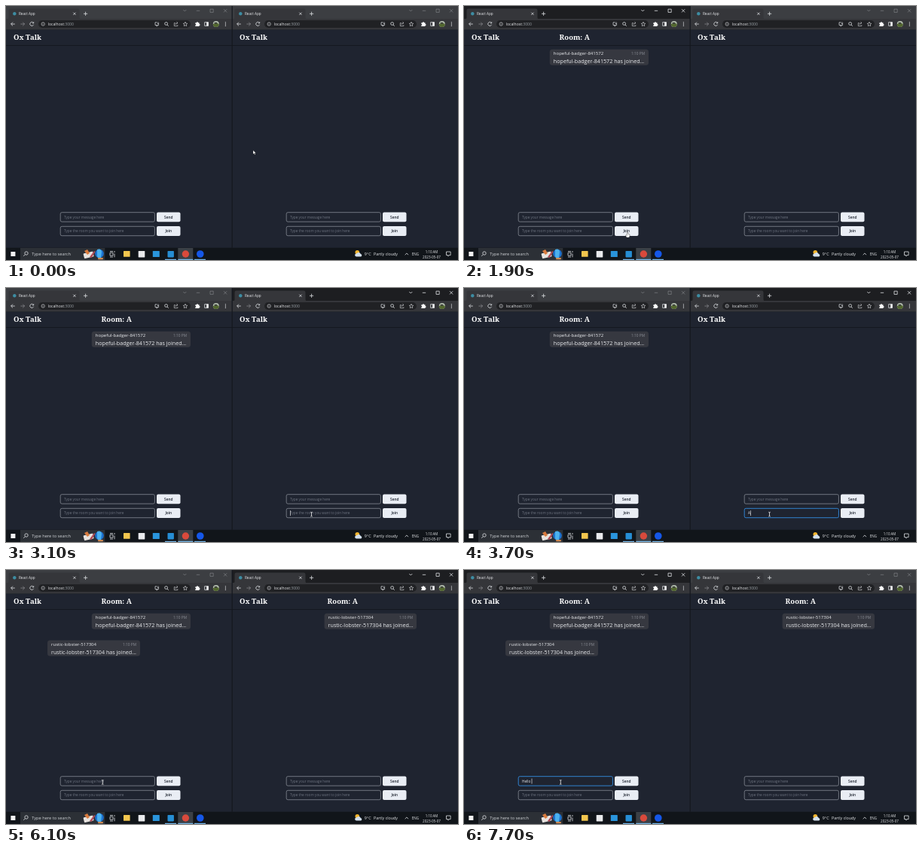
Animation, 600 px wide and 338 px high, one loop 8000 ms. Source, as an HTML page:

```html
<!DOCTYPE html>
<html lang="en">
<head>
<meta charset="utf-8">
<title>Chat demo</title>
<style>
  html, body { margin: 0; width: 100%; height: 100%; overflow: hidden; background: #1f2430; }
  svg { display: block; width: 100vw; height: 100vh; }
  text { font-family: "Open Sans", "Noto Sans", sans-serif; fill: #e8eaed; white-space: pre; }
  .head { font: bold 9.5px "Noto Serif", serif; fill: #fff; }
  .btn { font-size: 4.8px; font-weight: 600; fill: #1a202c; text-anchor: middle; }
  .field { font-size: 4.7px; }
  .line { fill: none; stroke: #dfe1e5; stroke-width: .8; }
</style>
</head>
<body>
<svg id="stage" viewBox="0 0 600 338" xmlns="http://www.w3.org/2000/svg"></svg>
<script>
const LOOP = 8000, STEP = 100;
const BADGER = 'hopeful-badger-841572', LOBSTER = 'rustic-lobster-517304';
const stage = document.getElementById('stage');
const $ = id => document.getElementById(id);

const text = (x, y, size, str, extra = '') =>
  `<text x="${x}" y="${y}" font-size="${size}" ${extra}>${str}</text>`;
const rect = (x, y, w, h, fill, rx = 0, extra = '') =>
  `<rect x="${x}" y="${y}" width="${w}" height="${h}" rx="${rx}" fill="${fill}" ${extra}/>`;
const dot = (x, y, r, fill) => `<circle cx="${x}" cy="${y}" r="${r}" fill="${fill}"/>`;
const line = (d, extra = '') => `<path class="line" d="${d}" ${extra}/>`;

function bubble(id, x, y, w, name) {
  return `<g id="${id}">${rect(x, y, w, 21, '#363840', 3.5)}
    ${text(x + 5, y + 7.3, 6.05, name)}
    ${text(x + w - 5, y + 7.2, 4.8, '1:10 PM', 'text-anchor="end" style="fill:#8c8f98"')}
    ${text(x + 5, y + 18, 7.17, name + ' has joined...')}</g>`;
}

function field(id, y, hint, label) {
  return `${rect(72.2, y, 125.2, 12.4, 'none', 2, `id="${id}Box"`)}
    <text id="${id}Hint" class="field" x="77" y="${y + 8}" style="fill:#6d737f">${hint}</text>
    <text id="${id}Text" class="field" x="77" y="${y + 8}"></text>
    ${rect(0, y + 2.8, .6, 7, '#fff', 0, `id="${id}Caret"`)}
    ${rect(200, y - .2, 31.5, 12.8, '#e9edf4', 2)}
    <text class="btn" x="215.8" y="${y + 8}">${label}</text>`;
}

function chrome(id) {
  return `${rect(0, 0, 300, 18, '#1d1e21', 0, `id="${id}Bar"`)}
    <path d="M1 17.5Q3.5 17.5 3.5 15V6Q3.5 3.5 6 3.5H95Q97.500 3.500 97.500 6V15Q97.500 17.500 100 17.500Z" fill="#35363a"/>
    ${rect(0, 17, 300, 14.5, '#35363a')}
    ${dot(11.3, 10.3, 2.2, '#3d8da3')}
    ${text(17, 12, 4.6, 'React App')}
    ${line('M89.300 8.700l3.200 3.200m0-3.200l-3.200 3.200M103 10.300h5.200m-2.600-2.600v5.200')}
    <g id="${id}Ctl">${line('M235.300 5l2 2 2-2M252.800 6.300h4.400M271 4.200h4.200v4.200h-4.200zM289 4.200l4.200 4.200m0-4.200l-4.200 4.200')}</g>
    ${line('M11.800 24H6.600m2.400-2.400L6.600 24l2.400 2.400')}
    ${line('M19.400 24h5.200m-2.400-2.400L24.600 24l-2.400 2.400', 'opacity=".45"')}
    ${line('M36.200 22.300A2.500 2.500 0 1 0 36.600 24.800M36.700 21.200v1.700H35')}
    ${rect(43, 18.9, 202, 10.2, '#202124', 5.1)}
    <circle class="line" cx="49.200" cy="24" r="2.200" style="stroke-width:.6"/>
    ${line('M49.200 23.600v1.600m0-2.700v.5', 'style="stroke-width:.5"')}
    ${text(55.8, 25.9, 5.05, 'localhost<tspan style="fill:#9aa0a6">:3000</tspan>')}
    ${line('M200.500 21.800h-2.500v3.700h4.600v-1.300M199.200 26.700h2.200M202 21.300v2.500m-1.200-1l1.200 1.200 1.200-1', 'style="stroke-width:.7"')}
    <circle class="line" cx="212.600" cy="23.500" r="1.900"/>${line('M214 25l1.800 1.800')}
    ${line('M224.800 22.600h-1.500v4h4.600v-1.400M224.800 25q.3-2.300 3-2.500m-1.200-1.300l1.400 1.300-1.400 1.300', 'style="stroke-width:.6"')}
    ${line('M238 21.200l.8 1.900 2 .2-1.500 1.400.4 2-1.700-1-1.700 1 .4-2-1.500-1.400 2-.2z', 'style="stroke-width:.6"')}
    <path d="M251.300 22.300h1.600a1.100 1.100 0 0 1 2.200 0h1.400v1.600a1.100 1.100 0 0 1 0 2.200v1h-5.200v-1.500a.9.9 0 0 0 0-1.800z" fill="#fff"/>
    ${line('M263.700 21.600h4.800v4.800h-4.800z')}${rect(266.2, 21.6, 2.3, 4.8, '#fff')}
    ${dot(278.8, 24, 4, '#b9c3b4')}
    <path d="M274.800 24a4 4 0 0 0 8 0q-3-2-8 0z" fill="#52672e"/>
    ${rect(276.4, 21.7, 4.2, 2, '#3b4038', 1)}
    ${[21.8, 24, 26.2].map(y => dot(291.4, y, .65, '#e8eaed')).join('')}`;
}

function win(id, x, bubbles) {
  return `<g transform="translate(${x})">${rect(0, 0, 300, 322, '#1f2430')}
    ${chrome(id)}
    ${rect(0, 31.3, 300, .7, '#25272d')}${rect(0, 52, 300, .9, '#13171f')}
    <text class="head" x="10" y="45.200">Ox Talk</text>
    <text class="head" id="${id}Room" x="126.600" y="45.200">Room: A</text>
    ${bubbles}
    ${field(id + 'Msg', 274.7, 'Type your message here', 'Send')}
    ${field(id + 'Join', 293.3, 'Type the room you want to join here', 'Join')}
  </g>`;
}

function taskbar() {
  return `${rect(0, 321.7, 600, 16.3, '#11151a')}
    ${rect(6.4, 327, 6, 6, '#f2f2f2')}
    ${rect(19, 322, 112.3, 16, '#2c3036')}
    <circle class="line" cx="27" cy="329" r="2.200"/>${line('M25.400 330.700l-2.200 2.200')}
    ${text(34.2, 332.2, 5.66, 'Type here to search', 'style="fill:#d0d3d7"')}
    ${rect(103, 328, 13, 7, '#e8e4e0', 1, 'transform="rotate(-14 109 331)"')}
    <path d="M104 326l4-2 3 5-3 2z" fill="#d97b3e"/><path d="M111 334l6-8 1.500 1-5 8z" fill="#b14b57"/>
    ${dot(124, 329.5, 5.8, '#1c72d0')}
    <path d="M121 324q5-2 6 3l-1 8q-4 2-5-2z" fill="#4cb1ee"/>${rect(122, 335, 7, 2.3, '#cc8954', 1)}
    ${line('M138 328.300h4v3.800h-4zM138 326.500h4M138 334h4M144 326v2m0 1.500v4.800')}
    ${rect(156, 326, 8.6, 7.8, '#f3c64e', .6)}
    ${rect(175.7, 326, 8.6, 8.4, '#e9eaec', .6)}
    ${rect(194.8, 326, 9, 8, '#2a95dc', .6)}
    ${rect(228.3, 322, 20, 16, '#3b4046')}
    ${rect(214.5, 326, 8.4, 8.4, '#268ed4', .8)}
    ${dot(238.4, 330, 4.7, '#d94a3c')}
    ${dot(257.8, 330, 4.8, '#1557e8')}
    ${rect(211, 336.8, 15, 1.2, '#75b5e6')}${rect(228.3, 336.8, 20, 1.2, '#75b5e6')}${rect(250, 336.8, 15, 1.2, '#75b5e6')}
    ${dot(466.3, 327.8, 2.8, '#f3b52f')}
    <path d="M465 333.500a2 2 0 0 1 .3-4 3 3 0 0 1 5.500.5 1.800 1.800 0 0 1 .2 3.500z" fill="#d3e0ee"/>
    ${text(475.8, 332, 5.35, '9°C')}${text(488, 332, 5.35, 'Partly cloudy')}
    ${line('M529.700 331.200l2.200-2.200 2.200 2.200')}
    ${text(538.8, 332, 4.6, 'ENG')}
    ${text(565, 328.6, 4.4, '1:10 AM', 'text-anchor="middle"')}
    ${text(565, 336, 4.6, '2023-05-07', 'text-anchor="middle"')}
    ${line('M584.500 327h5.600v4.600h-2l-1.200 1.500v-1.500h-2.400z')}`;
}

stage.innerHTML =
  win('L', 0, bubble('first', 113.8, 57.8, 131.2, BADGER) + bubble('second', 55, 93.6, 123, LOBSTER)) +
  win('R', 300, bubble('third', 122.6, 57.8, 122.4, LOBSTER)) +
  rect(299.6, 0, 1.2, 321.7, '#15181f') + taskbar() +
  `<g id="cursor">
    <path id="arrow" d="M0 0V5.200L1.300 4.100 2.200 6.100 3.100 5.700 2.200 3.800H3.800Z" fill="#fff" stroke="#111" stroke-width=".3"/>
    <path id="beam" d="M-1.200-2.800Q0-2.800 0-2V2.200Q0 3-1.200 3M1.200-2.800Q0-2.800 0-2M0 2.200Q0 3 1.200 3" fill="none" stroke="#f4f4f4" stroke-width=".8"/>
    <path id="hand" d="M-.7 0Q0-.8.7 0V2.300L3 3V5L2.200 7H-1.200L-2.600 4.300-1.800 3.700-.7 4.600Z" fill="#fff" stroke="#111" stroke-width=".35"/>
  </g>`;

// time, x, y of the pointer
const PATH = [[0, 328, 192], [499, 328, 192], [500, 132.5, 296], [1300, 132.5, 296], [1700, 217, 301],
  [1900, 217, 301], [2200, 238, 303], [2500, 389.5, 298], [3000, 405.5, 301], [3900, 405.5, 301],
  [4400, 516, 302], [4600, 516, 303], [4700, 517, 305.8], [4900, 517, 305.8], [5000, 516.5, 305.3],
  [5300, 516.5, 305.3], [6000, 128.3, 282.3], [LOOP, 128.3, 282.3]];

function pointerAt(t) {
  const i = Math.max(1, PATH.findIndex(p => p[0] > t));
  const [t0, x0, y0] = PATH[i - 1], [t1, x1, y1] = PATH[i];
  const u = (t - t0) / (t1 - t0), e = u * u * (3 - 2 * u);
  return [x0 + (x1 - x0) * e, y0 + (y1 - y0) * e];
}

const show = (id, on) => $(id).setAttribute('visibility', on ? 'visible' : 'hidden');
const mix = (a, b, u) => `rgb(${a.map((v, i) => Math.round(v + (b[i] - v) * u))})`;

function setWindow(id, active, joined) {
  $(id + 'Bar').setAttribute('fill', active ? '#1d1e21' : '#3c3e42');
  $(id + 'Ctl').setAttribute('opacity', active ? 1 : .35);
  show(id + 'Room', joined);
}

// focus: 0..1 strength of the blue ring
function setField(id, value, focus, caret) {
  $(id + 'Box').setAttribute('stroke', mix([139, 144, 154], [49, 130, 206], focus));
  $(id + 'Box').setAttribute('stroke-width', .75 + .25 * focus);
  const el = $(id + 'Text');
  el.textContent = value;
  show(id + 'Hint', !value);
  show(id + 'Caret', caret);
  $(id + 'Caret').setAttribute('x', 77 + (value ? el.getComputedTextLength() + .2 : 0));
}

function draw(t) {
  const within = (a, b) => t >= a && t < b;
  const ramp = (a, d) => Math.min(1, Math.max(0, (t - a) / d));
  const blink = since => (t - since) % 1000 < 500;

  setWindow('L', within(900, 3100) || t >= 6200, t >= 1800);
  setWindow('R', within(3100, 6200), t >= 5400);
  show('first', t >= 1800);
  show('second', t >= 5400);
  show('third', t >= 5400);

  const joinL = within(900, 1700), joinR = within(3100, 4500), msgL = t >= 6200;
  setField('LJoin', within(1100, 1800) ? 'A' : '', joinL ? 1 : 0, joinL && blink(t < 1100 ? 900 : 1100));
  setField('RJoin', within(3600, 5400) ? 'A' : '', joinR ? ramp(3100, 200) : 0, joinR && blink(t < 3600 ? 3100 : 3600));
  const keys = [6900, 7100, 7300, 7500, 7600, 7700].filter(k => t >= k);
  setField('LMsg', 'Hello '.slice(0, keys.length), msgL ? ramp(6100, 200) : 0,
    msgL && blink(keys.length ? keys[keys.length - 1] : 6200));
  setField('RMsg', '', 0, false);

  const [x, y] = pointerAt(t), lx = x % 300;
  const onRow = within(0, LOOP) && ((y > 274 && y < 287.5) || (y > 293 && y < 305.2));
  const beam = onRow && lx > 72 && lx < 198, hand = onRow && lx > 200 && lx < 232;
  show('beam', beam);
  show('hand', hand);
  show('arrow', !beam && !hand);
  $('cursor').setAttribute('transform', `translate(${x} ${y})`);
}

const start = performance.now();
function tick() {
  const t = (performance.now() - start) % LOOP;
  draw(Math.floor(t / STEP) * STEP);
  requestAnimationFrame(tick);
}
tick();
</script>
</body>
</html>
```
